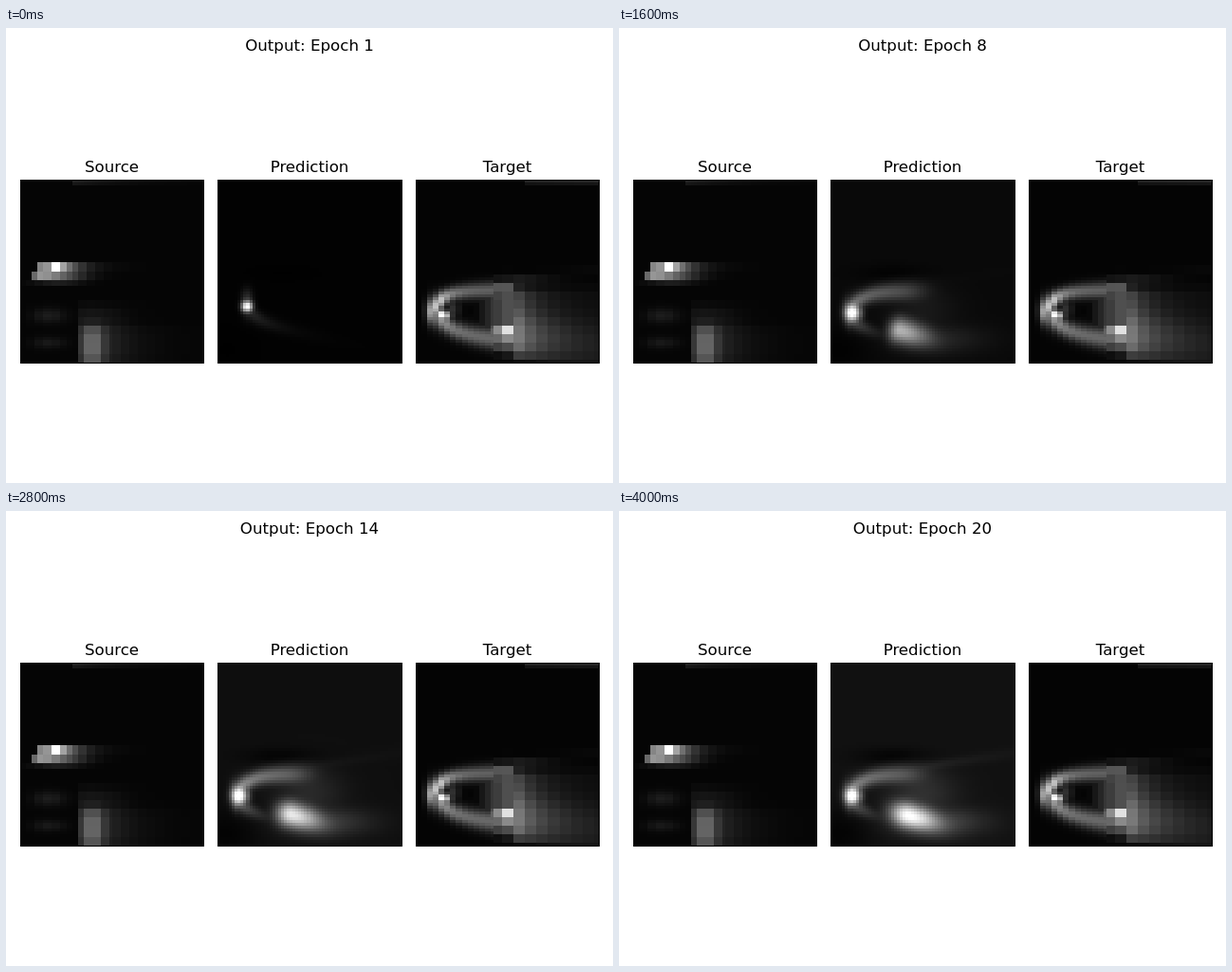
An HTML page with a canvas for the animation above (4200 ms loop, 640 px wide and 480 px high).

```html
<!DOCTYPE html>
<html lang="en">
<head>
<meta charset="utf-8">
<title>Output by epoch</title>
<style>
  html, body { margin: 0; width: 100%; height: 100%; overflow: hidden; background: #fff; }
  canvas { display: block; width: 640px; height: 480px; }
</style>
</head>
<body>
<canvas id="stage" width="640" height="480"></canvas>
<script>
const ctx = document.getElementById('stage').getContext('2d');
const N = 64, SIZE = 194, CELL = SIZE / N, TOP = 160;
const LOOP = 4200, STEP = 200;

const grid = document.createElement('canvas');
grid.width = grid.height = N;
const gridCtx = grid.getContext('2d');

const clamp = v => Math.max(0, Math.min(1, v));
const decay = (d, len) => Math.exp(-Math.max(0, d) / len);
const bell = (dx, dy, sx, sy) => Math.exp(-(dx * dx / (sx * sx) + dy * dy / (sy * sy)) / 2);
const rise = v => 1 / (1 + Math.exp(-v));
const snap = (i, start, step) => start + Math.floor((i - start) / step) * step + step / 2;

// Soft stroke that leaves (x0, y0) steeply, bends over and then drifts.
function arm(x, y, x0, y0, height, bend, drift, width) {
  const u = Math.max(0, x - x0), k = decay(u, bend);
  const mid = y0 + height * (1 - k) + drift * u;
  const slope = height / bend * k + drift;
  return bell(x - x0 - u, (y - mid) / Math.hypot(1, slope), width, width);
}

// Works in cells: two bright streaks above a coarse block.
function source(i, j) {
  const x = i < 14 ? snap(i, 2, 3) : i < 20 ? snap(i, 14, 2) : snap(i, 20, 3);
  const y = snap(j, 0, 3);
  if (j < 2 && i >= 18) return 5 + 26 * decay(i - 18, 16) * (j ? 0.7 : 1);
  if (j >= 29 && j < 32 && i >= 6) return 5 + (i < 11 ? 92 + 5.5 * x : 255 * decay(x - 12.5, 5.2));
  if (j >= 32 && j < 35 && i >= 4) return 5 + (i < 6 ? 100 : 145 * bell(x - 7, 0, 8.5, 1));
  if (j >= 35 && j < 37) return 5 + 24 * bell(x - 13, 0, 6, 1);
  if (j < 42) return 5;

  const haze = 24 * bell(x - 10, j - 47, 4, 1.8) + 20 * bell(x - 10, j - 56.5, 4, 1.4);
  if (i < 20) return 5 + haze;
  const core = i < 22 ? 50 : i < 28 ? 95 : i < 31 ? 50 : 30 * decay(x - 32, 9);
  return 5 + core * rise(y - 51.5) * (j > 60 ? 0.84 : 1) + 17 * bell(x - 25, y - 48, 8, 3);
}

// Trailing flow on the coarse right part, d px behind the step.
function wake(d, y) {
  const streak = 26 * decay(d, 55) * bell(0, y - 106 + d * 0.1, 1, 3);
  const upper = (68 * decay(d, 22) + 8) * rise((y - 114) / 2);
  const lower = 64 * decay(d, 70) * bell(0, y - 164 - d * 0.12, 1, 18);
  return streak + (upper + lower) * rise((187 + d * 0.2 - y) / 3);
}

function target(i, j) {
  if (j < 2 && i >= 38) return (j ? 18 : 32) + (i - 38) * 0.15;
  const step = i >= 27 ? 4 : 2;
  const x = CELL * snap(i, i >= 34 ? 34 : i >= 27 ? 26 : 0, step);
  const y = CELL * (i >= 27 ? snap(j, 0, 3) : j + 0.5);
  if (i >= 34) return 4 + wake(x - 103, y);

  const ramp = clamp((x - 62) / 30);
  return 4 + Math.max(
    (92 + 100 * decay(x - 28, 10)) * arm(x, y, 18, 139, -22, 12, 0, 4 + x * 0.03),
    (100 + 50 * decay(x - 28, 10)) * arm(x, y, 25, 144, 19, 14, 0.1, 4 + x * 0.05),
    265 * bell(x - 28, y - 143 - (x - 28) * 0.15, 6, 3.5),
    75 * ramp * rise((y - 114) / 2) * rise((177 - y) / 3),
    45 * bell(x - 39, y - 137, 5, 8),
    245 * ramp * bell(x - 93, y - 161, 11, 7)
  );
}

// Each feature settles, grows or wavers with the epoch n.
function predictor(n) {
  const early = Math.exp((1 - n) / 1.2);
  const late = rise((n - 13.5) * 1.5);
  const waver = 1 + 0.18 * Math.cos((n - 8) * 0.84);
  const noseX = 23.5 + 7.5 * early, noseY = 141 - 7 * early, noseW = 6.2 - 2 * early;
  const armLevel = 108 * (1 - Math.exp((1 - n) / 7)) * waver;
  const lobeX = 66 + 0.8 * n, lobeY = 158 + 0.2 * n;
  const lobeLevel = (170 + 72 * late) * (1 - early);
  const tail = (26 + 26 * late) * (1 - early);
  const ground = 2 + (7 + 8 * late) * (1 - early);
  const wisp = n * n / 16;

  return (i, j) => {
    const x = (i + 0.5) * CELL, y = (j + 0.5) * CELL;
    const dx = x - lobeX, dy = y - lobeY;
    const along = dx * 0.96 + dy * 0.28, across = dy * 0.96 - dx * 0.28;
    const near = decay(x - 22, 20);
    const parts = [
      265 * bell(x - noseX, y - noseY, noseW * 0.9, noseW),
      lobeLevel * bell(along, across, along < 0 ? 4.5 + 0.45 * n : 24, 9.5),
      armLevel * (0.9 + 0.5 * near) * rise((94 - x) / 9) * arm(x, y, 20, 139, -21, 13, 0, 4 + x * 0.045),
      armLevel * near * arm(x, y, 23, 146, 16, 14, 0.1, 5),
      wisp * decay(x - 92, 60) * rise((x - 92) / 6) * bell(0, y - 111 + (x - 92) * 0.15, 1, 4),
      tail * bell(x - 114, y - 169, 34, 11),
      tail * 0.6 * bell(x - 96, y - 138, 26, 18),
      early * 45 * bell(x - 31, y - 127, 4, 8),
      early * 36 * decay(x - 36, 28) * arm(x, y, 34, 139, 10, 12, 0.24, 5)
    ];
    const shade = (1 - 0.8 * bell(x - 68, y - 99, 28, 6)) * (1 - 0.8 * bell(x - 10, y - 180, 24, 18));
    return ground * shade + Math.hypot(...parts);
  };
}

function panel(left, width, title, field) {
  const image = gridCtx.createImageData(N, N);
  for (let j = 0; j < N; j++) {
    for (let i = 0; i < N; i++) {
      const at = (j * N + i) * 4;
      image.data.fill(field(i, j), at, at + 3);
      image.data[at + 3] = 255;
    }
  }
  gridCtx.putImageData(image, 0, 0);
  ctx.imageSmoothingEnabled = false;
  ctx.drawImage(grid, left, TOP - 0.5, width, SIZE);
  ctx.strokeStyle = '#000';
  ctx.strokeRect(left + 0.5, TOP + 0.5, width - 1, SIZE - 1);
  ctx.fillText(title, left + width / 2 - 0.5, 152);
}

function draw(epoch) {
  ctx.fillStyle = '#fff';
  ctx.fillRect(0, 0, 640, 480);
  ctx.fillStyle = '#000';
  ctx.font = '16.667px "DejaVu Sans", sans-serif';
  ctx.textAlign = 'center';
  ctx.fillText('Output: Epoch ' + epoch, 320, 24);
  panel(15, SIZE, 'Source', source);
  panel(223, SIZE + 1, 'Prediction', predictor(epoch));
  panel(432, SIZE, 'Target', target);
}

const start = performance.now();
let shown = 0;

function tick() {
  const time = (performance.now() - start) % LOOP;
  const epoch = Math.max(1, Math.floor(time / STEP));
  if (epoch !== shown) draw(shown = epoch);
  requestAnimationFrame(tick);
}
tick();
</script>
</body>
</html>
```
